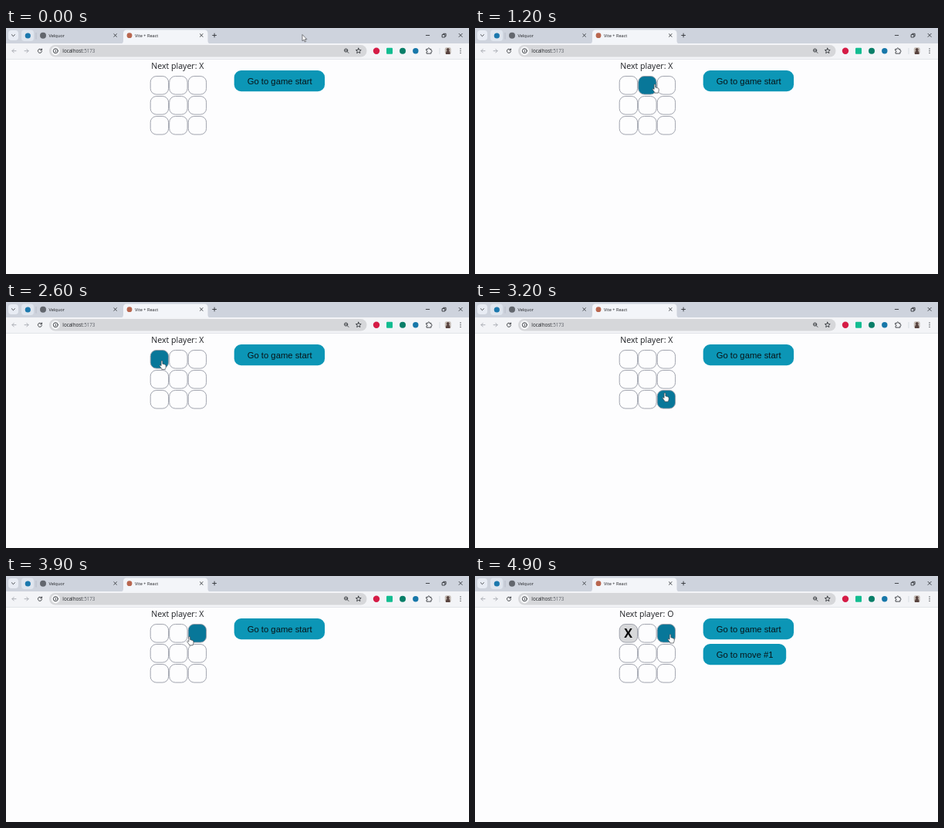
Recreate the animation shown at these times as an HTML page. Size 600 px wide and 319 px high, loop 5 s.

```html
<!DOCTYPE html>
<html lang="en">
<head>
<meta charset="utf-8">
<title>Tic-tac-toe</title>
<style>
  html, body { margin: 0; width: 100%; height: 100%; overflow: hidden; background: #fdfdfe; }
  svg { display: block; width: 100vw; height: 100vh; }
  text { font-family: "Open Sans", "Noto Sans", sans-serif; fill: #1d1f23; }
  .button text { font: 11.28px "Liberation Sans", Arial, sans-serif; fill: #071418; }
  .icon { fill: none; stroke: #34373c; stroke-width: .9; stroke-linecap: round; stroke-linejoin: round; }
</style>
</head>
<body>
<svg viewBox="0 0 600 319">
  <rect width="600" height="319" fill="#fdfdfe"/>

  <!-- Tab strip -->
  <rect width="600" height="21" fill="#ced3dd"/>
  <rect x="3" y="3" width="13" height="13" rx="4" fill="#e8ecf4"/>
  <path class="icon" d="M7.4 8.7l2 2 2-2"/>
  <rect x="20" y="2.5" width="16" height="14.5" rx="4" fill="#dfe5ee"/>
  <circle cx="28.3" cy="10" r="3.6" fill="#1b78ad"/>
  <path d="M39 6v8.5M145.500 0" stroke="#b0b6c1" stroke-width=".7"/>
  <circle cx="48" cy="9.700" r="4" fill="#62666d"/>
  <text x="55.500" y="11.900" font-size="5.600">Velquor</text>
  <path d="M148 20.500q4 0 4-4V7q0-4.500 4.500-4.500H257q4.500 0 4.500 4.500v9.500q0 4 4 4z" fill="#f3f5f9"/>
  <circle cx="160" cy="9.700" r="3.400" fill="#b8664f"/>
  <text x="167" y="11.900" font-size="5.600">Vite + React</text>
  <path class="icon" d="M139.800 7.700l3.600 3.600m0-3.600l-3.600 3.600M251.400 7.700l3.600 3.600m0-3.600l-3.600 3.600M267.700 9.500h4.800m-2.400-2.400v4.800"/>
  <path class="icon" d="M544.300 9.500h4.400M587 7.300l4.200 4.200m0-4.200l-4.200 4.200M565.500 8.600h3.400v3.400h-3.400zM566.700 8.500v-1.200h3.400v3.400h-1.200"/>

  <!-- Toolbar -->
  <rect y="20" width="600" height="20.500" fill="#f3f4f7"/>
  <path d="M0 40.500h600" stroke="#dde0e5" stroke-width=".8"/>
  <path class="icon" d="M13 29.700H8m2.200-2.300L8 29.700l2.200 2.300M24 29.700h5m-2.200-2.300l2.200 2.300-2.200 2.300" style="stroke:#a5a9af"/>
  <path class="icon" d="M46 28.100A2.600 2.600 0 1 0 46.500 30.500M46.500 27v1.900h-1.900"/>
  <rect x="56" y="22" width="411.500" height="15.500" rx="7.700" fill="#d6d7da"/>
  <circle cx="64.300" cy="29.700" r="5.700" fill="#f4f5f7"/>
  <circle class="icon" cx="64.300" cy="29.700" r="3"/>
  <path class="icon" d="M64.300 29.500v1.500M64.300 28.100v.01"/>
  <text x="73.300" y="31.900" font-size="6.250">localhost<tspan fill="#5f636a">:5173</tspan></text>
  <circle class="icon" cx="440.600" cy="29" r="2.100"/>
  <path class="icon" d="M442.200 30.600l1.800 1.800M439.700 29h1.800" stroke-width=".7"/>
  <path class="icon" d="M456.800 26.200l1 2.200 2.400.2-1.800 1.600.5 2.400-2.100-1.300-2.100 1.300.5-2.400-1.800-1.600 2.400-.2z"/>
  <circle cx="480" cy="29.700" r="4.200" fill="#d51c46"/>
  <rect x="493" y="25.700" width="8" height="8" rx="1" fill="#12bd91"/>
  <circle cx="514" cy="29.700" r="4" fill="#087e68"/>
  <circle cx="530.800" cy="29.700" r="3.700" fill="#1777a9"/>
  <path class="icon" d="M545 27.400h1.800c-.3-2 2.400-2 2.100 0h2v1.800c1.600-.2 1.600 2 0 1.900v2H545v-2c1.500 0 1.500-1.900 0-1.900z" stroke-width="1"/>
  <path d="M562 26v8" stroke="#ccd1d8" stroke-width=".7"/>
  <rect x="568.800" y="25.300" width="7.800" height="8.800" rx="2" fill="#c2b9b2"/>
  <path d="M570 34v-1.800q.2-2 1.600-2.400a1.900 2 0 1 1 2.300 0q1.400.4 1.600 2.400V34z" fill="#58433f"/>
  <g fill="#34373c"><circle cx="589" cy="27" r=".7"/><circle cx="589" cy="29.700" r=".7"/><circle cx="589" cy="32.400" r=".7"/></g>

  <!-- Game -->
  <text id="status" x="222.300" y="53" font-size="10.600" text-anchor="middle"></text>
  <g id="board" stroke="#979aa5" stroke-width=".9"></g>
  <text id="mark" x="198.700" y="80.400" font-size="16" font-weight="700" text-anchor="middle" style="fill:#050505">X</text>
  <g class="button">
    <rect x="295.700" y="55" width="117.400" height="27.200" rx="9" fill="#0c96b6"/>
    <text x="312.700" y="72.700">Go to game start</text>
  </g>
  <g class="button" id="move">
    <rect x="295.700" y="88" width="107.500" height="27.200" rx="9" fill="#0c96b6"/>
    <text x="312.700" y="105.700">Go to move #1</text>
  </g>

  <!-- Pointers, with the hot spot at 0,0 -->
  <path id="arrow" d="M0 0v8.300l1.900-1.700 1.300 2.900 1.400-.6-1.300-2.800h2.600z" fill="#fff" stroke="#45474c" stroke-width=".7" stroke-linejoin="round"/>
  <path id="hand" d="M-.9.300Q0-.8.900.3V4l1 .2.300.2 1.100.2.300.3q1.600 0 1.600 1.500v1.800q0 1-.8 2.200v.8H-.2v-.8L-2.800 7q-.6-1.300.6-1.500l1.300 1z" fill="#fff" stroke="#34383e" stroke-width=".65" stroke-linejoin="round"/>
</svg>
<script>
  const LOOP = 5000, STEP = 100;
  const PRESS = 4400, MOVE = 4600;
  const $ = id => document.getElementById(id);

  // time, x, y
  const path = [
    [0, 384, 8.500], [800, 385, 7], [900, 378, 13], [1200, 233, 73],
    [1400, 202, 76.200], [2600, 202, 76.200], [2800, 203, 102],
    [3000, 223, 125], [3200, 246, 118], [3500, 255, 88], [3600, 254.500, 85.700],
    [3800, 247, 79], [4200, 210, 77.500], [4600, 210, 77.500],
    [4800, 226, 87.300], [4900, 253, 75.800]
  ];

  const cells = Array.from({ length: 9 }, (_, i) => {
    const x = 187.200 + i % 3 * 24.500;
    const y = 62.500 + Math.floor(i / 3) * 26;
    const el = document.createElementNS("http://www.w3.org/2000/svg", "rect");
    const attrs = { x, y, width: 23.400, height: 23.600, rx: 7.700 };
    for (const key in attrs) el.setAttribute(key, attrs[key]);
    $("board").append(el);
    return { x, y, el };
  });

  function pointerAt(t) {
    const next = path.findIndex(p => p[0] > t);
    if (next < 0) return path[path.length - 1].slice(1);
    const [t0, x0, y0] = path[next - 1], [t1, x1, y1] = path[next];
    const k = (t - t0) / (t1 - t0);
    return [x0 + (x1 - x0) * k, y0 + (y1 - y0) * k];
  }

  const show = (id, on) => $(id).setAttribute("visibility", on ? "visible" : "hidden");

  function render(time) {
    const t = Math.floor(time % LOOP / STEP) * STEP;
    const [x, y] = pointerAt(t);
    const hovered = cells.findIndex(c => x > c.x && x < c.x + 23.400 && y > c.y && y < c.y + 23);
    const overButton = x > 296 && x < 413 && y > 55 && y < 82;
    const pointing = hovered >= 0 || overButton;

    cells.forEach(({ el }, i) => {
      const used = i === 0 && t >= PRESS;
      el.setAttribute("fill", used ? "#d7d8da" : i === hovered ? "#087799" : "#fdfdfe");
    });
    $("status").textContent = "Next player: " + (t >= MOVE ? "O" : "X");
    show("mark", t >= MOVE);
    show("move", t >= MOVE);
    show("hand", pointing);
    show("arrow", !pointing);
    $(pointing ? "hand" : "arrow").setAttribute("transform", `translate(${x} ${y})`);
  }

  const start = performance.now();
  function tick() {
    render(performance.now() - start);
    requestAnimationFrame(tick);
  }
  tick();
</script>
</body>
</html>
```
